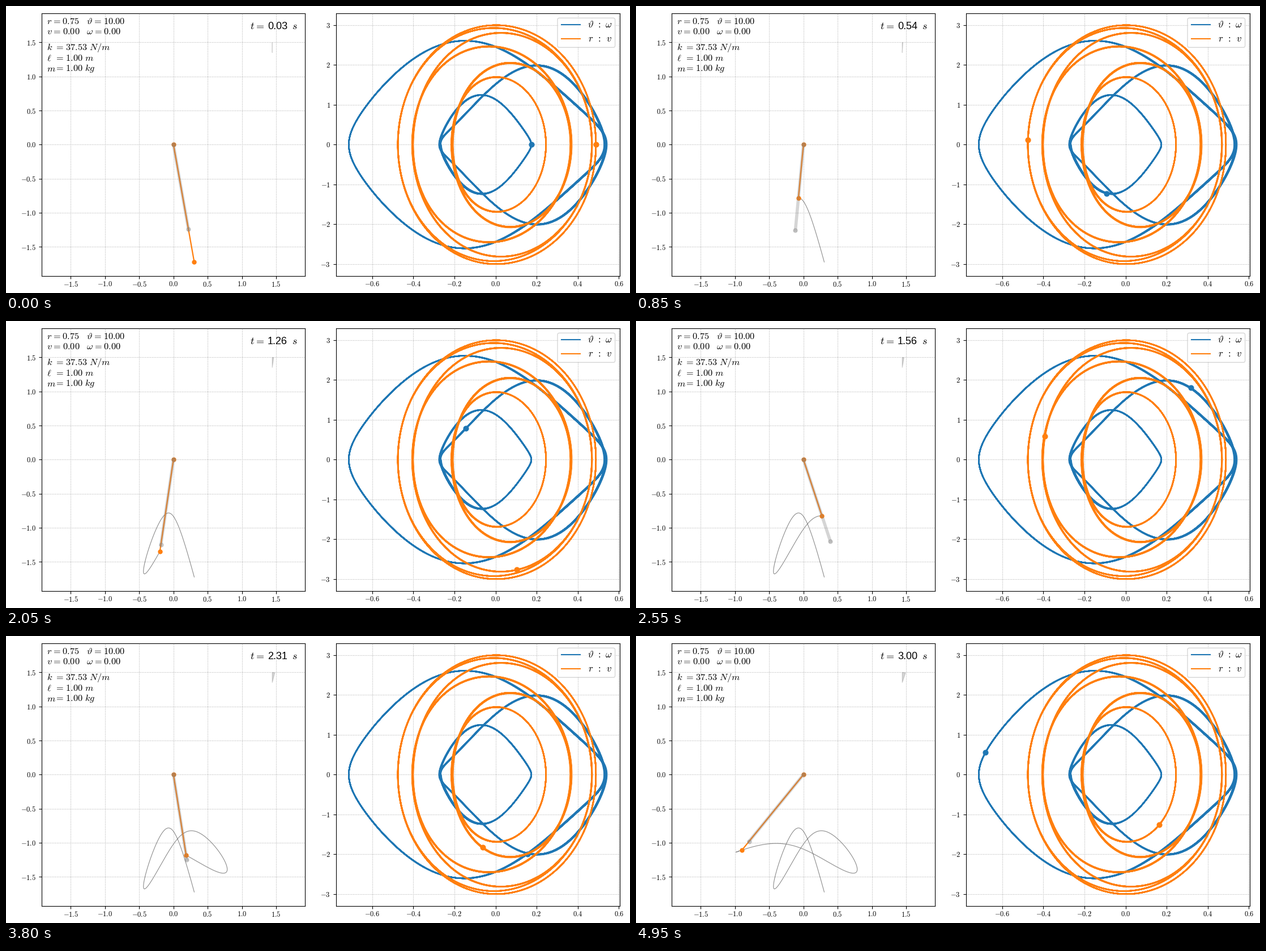
A matplotlib script that plays this animation: 1102 px wide and 508 px high, repeating every 5000 ms.

```python
import math

import numpy as np
import matplotlib.pyplot as plt
from matplotlib.animation import FuncAnimation
from matplotlib.patches import FancyBboxPatch, Wedge

W, H, DPI = 1102, 508, 100
BLUE, ORANGE = "#1f77b4", "#ff7f0e"

# spring pendulum
G, K, L, M = 9.81, 37.53, 1.0, 1.0
R0, TH0 = L + 0.75, math.radians(10)
REST = L + M * G / K
DT, T_LOOP, T_MAX = 0.002, 6.0, 60.0
DRIFT = 0.009
FRAME_DT, FRAMES = 0.03, 100
STEP = round(FRAME_DT / DT)


def deriv(s):
    r, th, v, w = s
    return np.array([
        v,
        w,
        r * w * w + G * math.cos(th) - K / M * (r - L),
        -(G * math.sin(th) + 2 * v * w) / r,
    ])


def rk4(s):
    a = deriv(s)
    b = deriv(s + DT / 2 * a)
    c = deriv(s + DT / 2 * b)
    d = deriv(s + DT * c)
    return s + DT / 6 * (a + 2 * b + 2 * c + d)


def solve():
    """Follow the orbit for as long as its swings repeat those of the first loop."""
    s = np.array([R0, TH0, 0.0, 0.0])
    out, turns, end = [s], [TH0], 0
    for i in range(round(T_MAX / DT)):
        new = rk4(s)
        out.append(new)
        if s[3] * new[3] < 0:
            if i * DT < T_LOOP:
                turns.append(new[1])
            elif min(abs(new[1] - t) for t in turns) > DRIFT:
                break
            end = i
        s = new
    return np.array(out[:max(end, round(10 / DT))]).T


r, th, v, w = solve()
x, y = r * np.sin(th), -r * np.cos(th)

plt.rcParams["mathtext.fontset"] = "cm"
fig = plt.figure(figsize=(W / DPI, H / DPI), dpi=DPI, facecolor="white")


def panel(left, right, xlim, ylim, xticks, yticks, xfmt, yfmt):
    top, bottom = 13.2, 477.5
    ax = fig.add_axes([left / W, 1 - bottom / H, (right - left) / W, (bottom - top) / H])
    ax.set(xlim=xlim, ylim=ylim)
    ax.set_xticks(xticks, [f"${t:{xfmt}}$" for t in xticks])
    ax.set_yticks(yticks, [f"${t:{yfmt}}$" for t in yticks])
    ax.tick_params(labelsize=9)
    ax.tick_params(axis="x", pad=2.8)
    ax.grid(ls=":", lw=0.8, color="#b0b0b0")
    ax.set_axisbelow(True)
    return ax


# motion panel
lim = 1.1 * R0
ticks = np.arange(-3, 4) / 2
ax = panel(63, 528.4, (-lim, lim), (-lim, lim), ticks, ticks, ".1f", ".1f")
trail, = ax.plot([], [], color="0.55", lw=0.8)
spring, = ax.plot([], [], "o-", color=ORANGE, lw=1.6, ms=5)
rod, = ax.plot([], [], "o-", color="gray", lw=4, ms=5, alpha=0.33)
clock = Wedge((1.444, 1.35), 0.15, 90, 90, fc="gray", ec="gray", lw=0.9, alpha=0.33)
ax.add_patch(clock)

# phase panel
phase = panel(582.6, 1084, (-0.777, 0.6047), (-3.294, 3.294),
              np.arange(-3, 4) / 5, np.arange(-3, 4), ".1f", "d")
phase.plot(th[::5], w[::5], color=BLUE, lw=1.7)
phase.plot(r[::5] - REST, v[::5], color=ORANGE, lw=1.7)
dot_th, = phase.plot([], [], "o", color=BLUE, ms=6.3, zorder=1.9)
dot_r, = phase.plot([], [], "o", color=ORANGE, ms=6.3, zorder=1.9)

# overlay in pixel units for text and legend
over = fig.add_axes([0, 0, 1, 1])
over.set(xlim=(0, W), ylim=(H, 0))
over.axis("off")
GAP = r"\hspace{0.078}"
EQ = GAP + "=" + GAP


def label(px, py, text, size=11.7):
    return over.text(px, py, f"${text}$", fontsize=size, ha="left", va="baseline")


label(72, 32, f"r{EQ}0.75")
label(142, 32, rf"\vartheta{EQ}10.00")
label(72, 50.5, f"v{EQ}0.00")
label(142, 50.5, rf"\omega{EQ}0.00")
for py, sym, val in ((78.5, "k", r"37.53\ N/m"),
                     (97, r"\ell", r"1.00\ m"),
                     (115.5, "m", r"1.00\ kg")):
    label(72, py, sym)
    label(85.5, py, f"={GAP}{val}")

label(431, 41, f"t{EQ}", 13)
label(505, 41, "s", 13)
timer = over.text(462, 41, "", fontsize=13, family="Liberation Sans",
                  ha="left", va="baseline")

over.add_patch(FancyBboxPatch((977.3, 24.6), 95, 45.4, boxstyle="round,pad=3.3",
                              fc="white", ec="0.8", lw=1, alpha=0.8))
for py, color, a, b, shift in ((33, BLUE, r"\vartheta", r"\omega", 0),
                               (58, ORANGE, "r", "v", 1.5)):
    over.plot([980.6, 1013.6], [py, py], color=color, lw=1.5)
    label(1027 + shift, py + 5, a, 12)
    label(1043, py + 5, ":", 12)
    label(1058 + shift, py + 5, b, 12)


def update(n):
    i = n * STEP
    t = FRAME_DT * (n + 1)
    trail.set_data(x[:i + 1:5], y[:i + 1:5])
    spring.set_data([0, x[i]], [0, y[i]])
    rod.set_data([0, REST * math.sin(th[i])], [0, -REST * math.cos(th[i])])
    clock.set_theta1(90 - 6 * t)
    dot_th.set_data([th[i]], [w[i]])
    dot_r.set_data([r[i] - REST], [v[i]])
    timer.set_text(f"{t:.2f}")
    return trail, spring, rod, clock, dot_th, dot_r, timer


anim = FuncAnimation(fig, update, frames=FRAMES, interval=50, repeat=True,
                     repeat_delay=0, blit=False)
plt.show()
```
